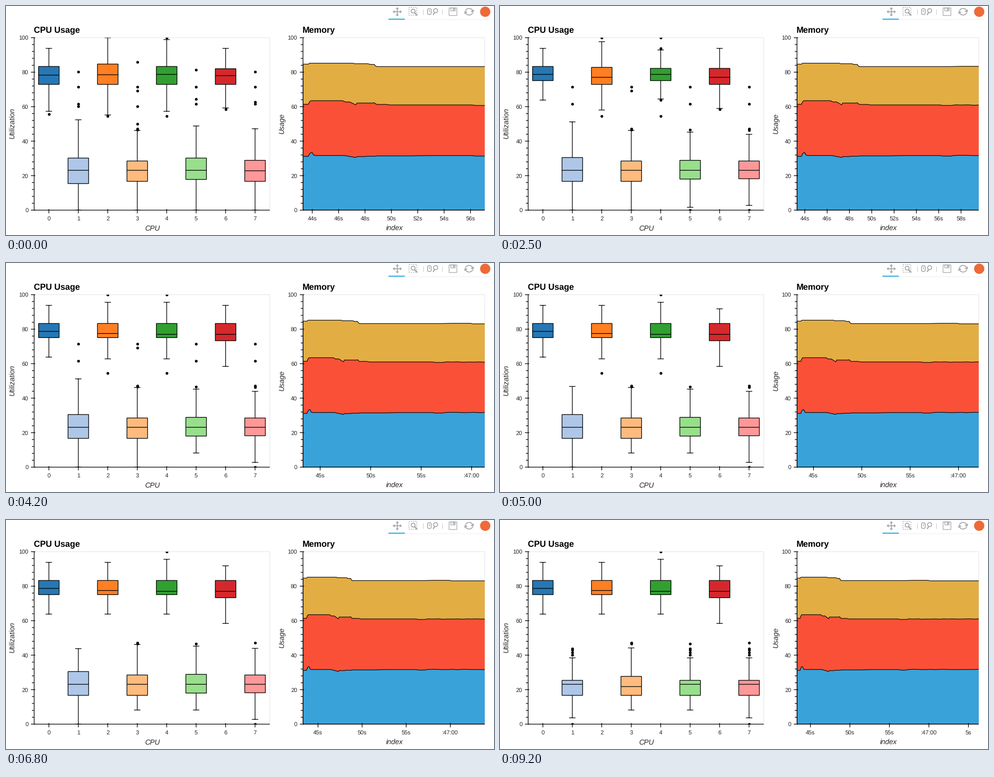
Recreate the animation shown at these times as a matplotlib script. Size 999 by 470 pixels, loop 9.3 s.

```python
import numpy as np
import matplotlib.pyplot as plt
from matplotlib.animation import FuncAnimation
from matplotlib.patches import Arc, Circle, FancyBboxPatch, Polygon, Rectangle

W, H, DPI = 999, 470, 64
FRAMES, INTERVAL = 93, 100
PT = 72 / DPI  # points per pixel
TOP, BASE = 65, 419
CPU_L, CPU_R = 57.6, 540
MEM_L, MEM_R = 608, 980
T0, SPAN0, RATE = 43.3, 13.78, 0.1003  # seconds
INK, GREY = "#262626", "#a3a6a8"

plt.rcParams.update({"font.family": "Liberation Sans", "path.snap": False,
                     "text.hinting": "none"})
fig = plt.figure(figsize=(W / DPI, H / DPI), dpi=DPI, facecolor="white")
ax = fig.add_axes([0, 0, 1, 1])
ax.set_xlim(0, W)
ax.set_ylim(H, 0)
ax.axis("off")


def y_of(value):
    return BASE - np.asarray(value) * (BASE - TOP) / 100


def line(xs, ys, color="black", width=1.35, z=5, **kw):
    kw.setdefault("solid_capstyle", "butt")
    return ax.plot(xs, ys, color=color, lw=width * PT, zorder=z, **kw)[0]


def label(x, y, text, size=11.7, ha="center", color=INK, **kw):
    return ax.text(x, y, text, fontsize=size * PT, ha=ha, va="baseline",
                   color=color, rotation_mode="anchor", zorder=6, **kw)


def clip_box(left, right):
    return Rectangle((left, TOP), right - left, BASE - TOP, transform=ax.transData)


def draw_frame(left, right, title, xname, yname, yname_x):
    line([left, right, right], [TOP, TOP, BASE], "#e5e5e5", 1.1, 1)
    line([left, left], [TOP, BASE])
    line([left, right], [BASE, BASE])
    for v in range(0, 101, 4):
        y = y_of(v)
        major = v % 20 == 0
        line([left - (6.5 if major else 4.4), left + (2.2 if major else 0)], [y, y])
        if major:
            label(left - 12, y + 4.2, str(v), ha="right")
    label(left - 0.8, 55, title, 17.5, "left", "black", weight="bold")
    label((left + right) / 2 + 1, 461, xname, 14.6, style="italic")
    label(yname_x, 240.5, yname, 14.6, style="italic", rotation=90)


# ---- toolbar ----
def shape(patch):
    patch.set_zorder(5)
    ax.add_patch(patch)


def solid(patch, color=GREY):
    patch.set(facecolor=color, edgecolor="none")
    shape(patch)


def outline(patch, width=1.3):
    patch.set(fill=False, edgecolor=GREY, linewidth=width * PT)
    shape(patch)


def triangle(x, y, dx, dy, half=3.5):
    """Arrowhead whose base is centred on (x, y), pointing along (dx, dy)."""
    n = np.hypot(dx, dy)
    sx, sy = -dy / n * half, dx / n * half
    solid(Polygon([(x + sx, y + sy), (x + dx, y + dy), (x - sx, y - sy)]))


def draw_toolbar():
    line([783, 992], [28, 28], "#ececec", 1)
    cx, cy = 801, 11.8
    line([cx - 7, cx + 7], [cy, cy], GREY, 1.8)
    line([cx, cx], [cy - 7, cy + 7], GREY, 1.8)
    for dx, dy in ((1, 0), (-1, 0), (0, 1), (0, -1)):
        triangle(cx + 5.5 * dx, cy + 5.5 * dy, 4 * dx, 4 * dy)
    solid(Rectangle((783, 26), 33.5, 2), "#26aae1")

    line([825, 841, 841, 825, 825], [3, 3, 19, 19, 3], GREY, 1.2, dashes=(2, 1.5))
    outline(Circle((833.5, 10.5), 4), 1.8)
    line([836.3, 842], [13.5, 19.5], GREY, 2.6)

    for x in (854.5, 893.5):
        line([x, x], [7, 18], "#c4c6c8", 1)

    outline(FancyBboxPatch((865.5, 8), 2.5, 7,
                           boxstyle="round,pad=2.5,rounding_size=3.2"), 1.6)
    line([866.8, 866.8], [8.5, 12], GREY, 1.6)
    outline(Circle((879.5, 9.5), 4.2), 1.7)
    line([877.5, 874.5], [13, 18.5], GREY, 2.2)

    outline(Rectangle((907, 4), 16, 15.5))
    outline(Rectangle((910.5, 4), 9, 6))
    solid(Rectangle((915.5, 5), 2.5, 4))

    for start in (195, 15):
        outline(Arc((948, 11.8), 15.5, 13.5, theta1=start, theta2=start + 140), 1.8)
    triangle(954.5, 9, 2.3, 4.5, 4)
    triangle(941.5, 14.6, -2.3, -4.5, 4)

    solid(Circle((981, 11.8), 10.5), "#ee6a36")


# ---- box plots ----
SURGE = range(8, 20)       # a short busy spell on the odd cores
GONE, LEFT = 20, 46        # when two groups of old samples leave the window
STAY = FRAMES
LATE = {84: (16.7, 23.1, 25.4)}
RECENT = {STAY: (43.8, 42.8, 41.6, 40.1)}


class Box:
    """Quartiles by start frame; extreme samples by the frame they leave.

    Whiskers end at 1.5 box heights or at the outermost sample.
    """
    HALF, CAP = 21.1, 6.5

    def __init__(self, n, color, quartiles, *samples):
        self.n, self.quartiles = n, quartiles
        self.samples = [(leave, v) for group in samples
                        for leave, values in group.items() for v in values]
        self.x = x = CPU_L + (n + 0.5) * (CPU_R - CPU_L) / 8
        self.rect = Rectangle((x - self.HALF, 0), 2 * self.HALF, 1, zorder=3,
                              facecolor=color, edgecolor="black", linewidth=1.35 * PT)
        ax.add_patch(self.rect)
        self.lines = line([], [], z=4)
        self.marks = line([], [], z=4, ls="none", marker="o", ms=5.7 * PT, mew=0)
        for artist in (self.rect, self.lines, self.marks):
            artist.set_clip_path(clip_box(CPU_L - 0.5, CPU_R))
        line([x, x], [BASE - 2.2, BASE + 6.5])
        label(x, 440.3, str(n))

    def stats(self, i):
        q1, med, q3 = self.quartiles[max(k for k in self.quartiles if k <= i)]
        if self.n % 2 and i in SURGE:
            q1, q3 = q1 + 1.5, q3 + 0.5
        alive = [v for leave, v in self.samples if i < leave]
        reach = 1.5 * (q3 - q1)
        lo, hi = max(min(alive), q1 - reach), min(max(alive), q3 + reach)
        return q1, med, q3, lo, hi, [v for v in alive if not lo <= v <= hi]

    def update(self, i):
        *levels, dots = self.stats(i)
        q1, med, q3, lo, hi = y_of(levels)
        x, c, h, gap = self.x, self.CAP, self.HALF, np.nan
        self.rect.set_y(q3)
        self.rect.set_height(q1 - q3)
        self.lines.set_data(
            [x - c, x + c, gap, x, x, gap, x - h, x + h, gap, x, x, gap, x - c, x + c],
            [hi, hi, gap, hi, q3, gap, med, med, gap, q1, lo, gap, lo, lo])
        self.marks.set_data([x] * len(dots), y_of(dots))


def make_boxes():
    yield Box(0, "#2677b4",
              {0: (72.9, 78.3, 83.3), 7: (75.1, 78.7, 84.7), 19: (75.1, 78.7, 83.3)},
              {6: [55.6], STAY: [63.8, 93.8]})
    yield Box(1, "#aec7e8",
              {0: (15.4, 23.1, 30.2), 8: (16.7, 23.1, 30.5)} | LATE,
              {GONE: [80.2, 60.2], LEFT: [71.5, 61.6], 58: [46.8], STAY: [0]}, RECENT)
    yield Box(2, "#ff7f22",
              {0: (72.9, 78.5, 84.7), 20: (72.9, 77, 82.8), 34: (75.1, 77.5, 83.3)},
              {LEFT: [100], 60: [54.5], STAY: [63.8, 93.8]})
    yield Box(3, "#ffbb7e",
              {0: (16.7, 23.1, 28.5), 84: (16.7, 21.8, 27.7)},
              {GONE: [85.9, 60.2, 50], LEFT: [71.5, 69.2, 0], STAY: [47.2, 46.7, 8.2]})
    yield Box(4, "#30a030",
              {0: (72.9, 78.7, 83.3), 7: (75.1, 79, 83.3), 20: (75.1, 78.7, 82.2),
               38: (75.1, 77, 83.3)},
              {60: [54.5], STAY: [100, 93.8, 63.8]})
    yield Box(5, "#98df8c",
              {0: (17.8, 23.1, 30.2), 20: (18, 23.1, 28.9)} | LATE,
              {GONE: [81.4, 64.4], LEFT: [71.5, 61.6], 34: [0], STAY: [46.7, 8.2]}, RECENT)
    yield Box(6, "#d5282c",
              {0: (72.9, 78, 82), 7: (73.3, 78.7, 83.3), 20: (72.9, 77, 82.2),
               34: (73.3, 77, 83.3)},
              {LEFT: [93.8], STAY: [91.8, 58.4]})
    yield Box(7, "#ff9898",
              {0: (16.7, 22.8, 28.9), 20: (18.2, 23.1, 28.5)} | LATE,
              {GONE: [80.2, 62.6], LEFT: [71.5, 61.6], 60: [46.2], STAY: [47.1, 0]}, RECENT)


# ---- stacked areas ----
SECONDS = np.arange(T0, T0 + SPAN0 + RATE * FRAMES + 1, 0.1)


def level(start, *changes):
    """A level that shifts by (second, amount, duration) along the time line."""
    return start + sum(d * np.clip((SECONDS - t) / w, 0, 1) for t, d, w in changes)


def wobble(seed, size=0.13):
    """Slow noise that begins after the quiet stretch."""
    knots = np.arange(57.5, SECONDS[-1] + 1, 0.55)
    noise = np.random.default_rng(seed).uniform(-size, size, len(knots))
    return np.interp(SECONDS, knots, noise, left=0)


def px_of(t, span):
    return MEM_L + (np.asarray(t) - T0) * (MEM_R - MEM_L) / span


class Area:
    def __init__(self, values, color, z):
        self.ys = np.concatenate([[BASE], y_of(values), [BASE]])
        self.ts = np.concatenate([SECONDS[:1], SECONDS, SECONDS[-1:]])
        self.patch = Polygon([(0, 0), (1, 0), (1, 1)], facecolor=color,
                             edgecolor="black", linewidth=1.2 * PT, zorder=z)
        ax.add_patch(self.patch)
        self.patch.set_clip_path(clip_box(MEM_L, MEM_R))

    def update(self, span):
        self.patch.set_xy(np.column_stack([px_of(self.ts, span), self.ys]))


def make_areas():
    yield Area(level(84.65, (43.7, 0.55, 0.1), (47.1, -0.3, 0.1), (48.26, -0.4, 0.1),
                     (48.7, -1.25, 0.14), (57, 0.15, 1), (59.95, -0.3, 0.1)),
               "#e2ad43", 2)
    yield Area(level(61.4, (43.73, 2.05, 0.1), (46.34, -0.7, 0.14), (46.85, -1.7, 0.45),
                     (47.3, 1.05, 0.1), (48.6, 0.2, 0.1), (48.74, -1, 0.1),
                     (49.6, -0.3, 0.3), (56.1, -0.3, 0.3), (57.1, 0.25, 0.3))
               + wobble(4), "#fb5038", 2.1)
    yield Area(level(31.2, (43.73, 2.1, 0.1), (44.02, -1.6, 0.1), (46.4, -1.15, 0.9),
                     (47.3, 0.5, 0.1), (48, 0.2, 0.1), (48.8, 0.2, 0.1),
                     (51.5, 0.2, 1.5), (56.1, -0.3, 0.3), (57.1, 0.35, 0.3))
               + wobble(7), "#39a2d9", 2.2)


class TimeAxis:
    def __init__(self):
        self.ticks = [(line([], []), label(0, 440.3, "")) for _ in range(10)]

    def update(self, span):
        # the step whose tick count is nearest to six
        step = min((2, 5), key=lambda s: abs(span / s - 6))
        times = np.arange(np.ceil(T0 / step) * step, T0 + span, step)
        for k, (tick, text) in enumerate(self.ticks):
            shown = k < len(times)
            tick.set_visible(shown)
            text.set_visible(shown)
            if shown:
                sec = int(times[k])
                x = float(px_of(sec, span))
                tick.set_data([x, x], [BASE - 2.2, BASE + 6.5])
                text.set_x(x)
                text.set_text(":47:00" if sec == 60 else f"{sec % 60}s")


draw_toolbar()
draw_frame(CPU_L, CPU_R, "CPU Usage", "CPU", "Utilization", 18)
draw_frame(MEM_L, MEM_R, "Memory", "index", "Usage", 569)
boxes = list(make_boxes())
timeline = [*make_areas(), TimeAxis()]


def update(i):
    for box in boxes:
        box.update(i)
    for part in timeline:
        part.update(SPAN0 + RATE * i)
    return []


anim = FuncAnimation(fig, update, frames=FRAMES, interval=INTERVAL,
                     init_func=lambda: update(0), repeat=True, repeat_delay=0)
plt.show()
```
